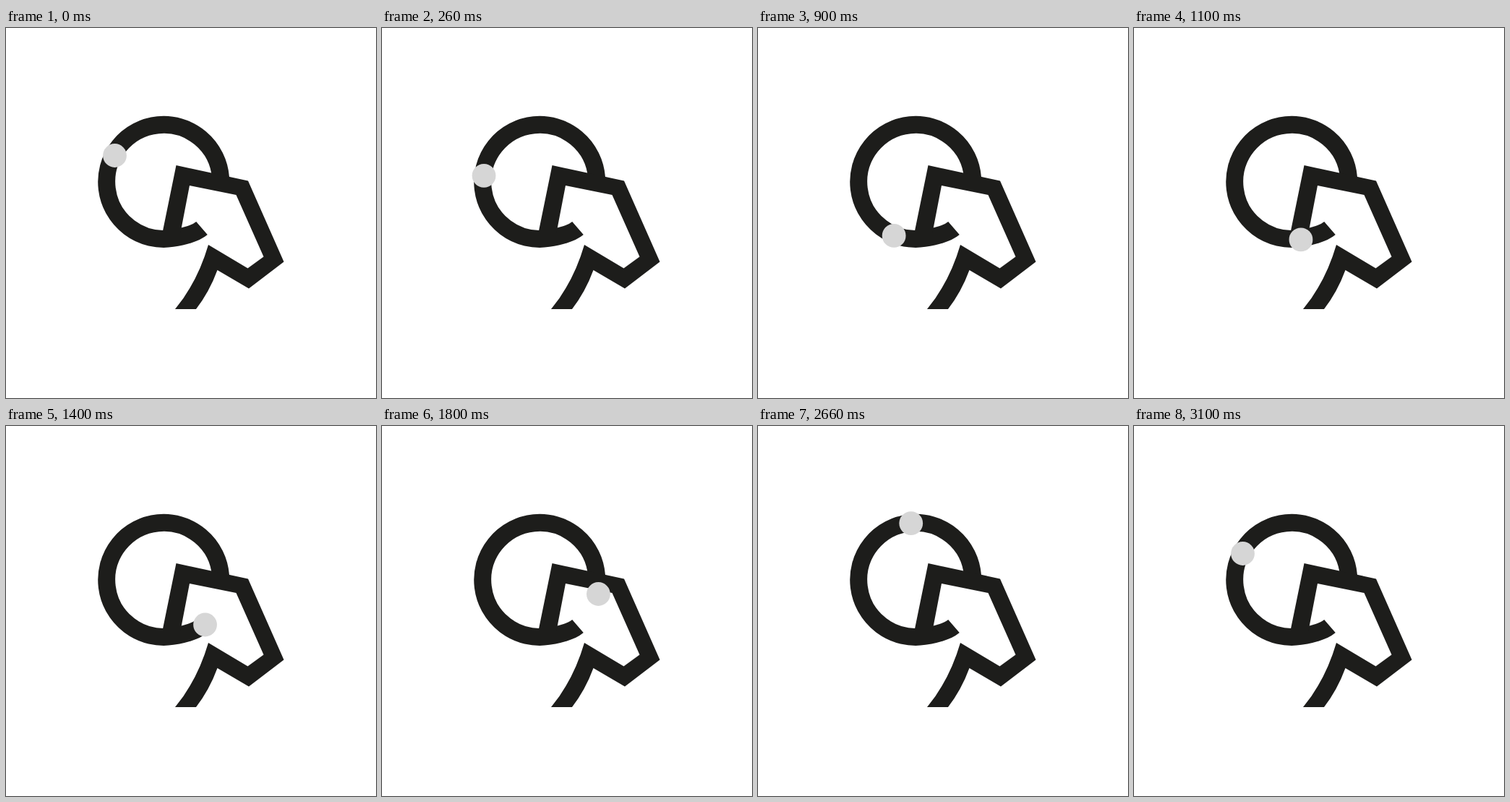
Recreate the animation shown at these times as an HTML page without scripts. Size 512 px wide and 512 px high, loop 3.13 s.

```html
<!DOCTYPE html>
<html lang="en">
<head>
<meta charset="utf-8">
<title>Circular gesture</title>
<style>
  html, body { margin: 0; width: 100%; height: 100%; overflow: hidden; background: #fff; }
  svg { display: block; width: 100vw; height: 100vh; }
  .ring { fill: none; stroke: #1d1d1b; stroke-width: 24; }
  .hand { fill: #1d1d1b; }
  .dot {
    fill: #d6d6d6;
    offset-path: path("M150.5 176.5A80 80 0 0 0 147 248A80 80 0 0 0 230.5 293A80 80 0 0 0 295 251.5A80 80 0 0 0 295 196.5A80 80 0 0 0 264.5 150.5A80 80 0 0 0 212.5 134.5A80 80 0 0 0 150.5 176.5");
    offset-rotate: 0deg;
    animation: orbit 3130ms infinite;
  }
  /* Slow steps alternate with short quick bursts. */
  @keyframes orbit {
    0%      { offset-distance: 0;     animation-timing-function: steps(4); }
    16.58%  { offset-distance: 59px;  animation-timing-function: steps(3); }
    20.09%  { offset-distance: 103px; animation-timing-function: steps(3); }
    32.55%  { offset-distance: 147px; animation-timing-function: steps(2); }
    35.11%  { offset-distance: 176px; animation-timing-function: steps(1); }
    39.26%  { offset-distance: 192px; animation-timing-function: steps(1); }
    40.22%  { offset-distance: 208px; animation-timing-function: steps(4); }
    57.28%  { offset-distance: 275px; animation-timing-function: steps(2); }
    59.39%  { offset-distance: 312px; animation-timing-function: steps(6); }
    84.88%  { offset-distance: 424px; animation-timing-function: steps(1); }
    86.23%  { offset-distance: 443px; animation-timing-function: steps(3); }
    98.69%, 100% { offset-distance: 502px; }
  }
</style>
</head>
<body>
<svg viewBox="0 0 512 512">
  <path class="ring" d="M271 277Q260 286.4 230 291A79 79 0 1 1 297 207"/>
  <path class="hand" d="M216.5 283L235.5 190L335 211.5L384.5 323.5L336 360.5L292.5 335Q281.5 365 263 389H234Q265 351.5 280 300L334.5 332.5L356.5 316.5L318.5 231L254 218L241.5 283Z"/>
  <circle class="dot" r="16.4"/>
</svg>
</body>
</html>
```
